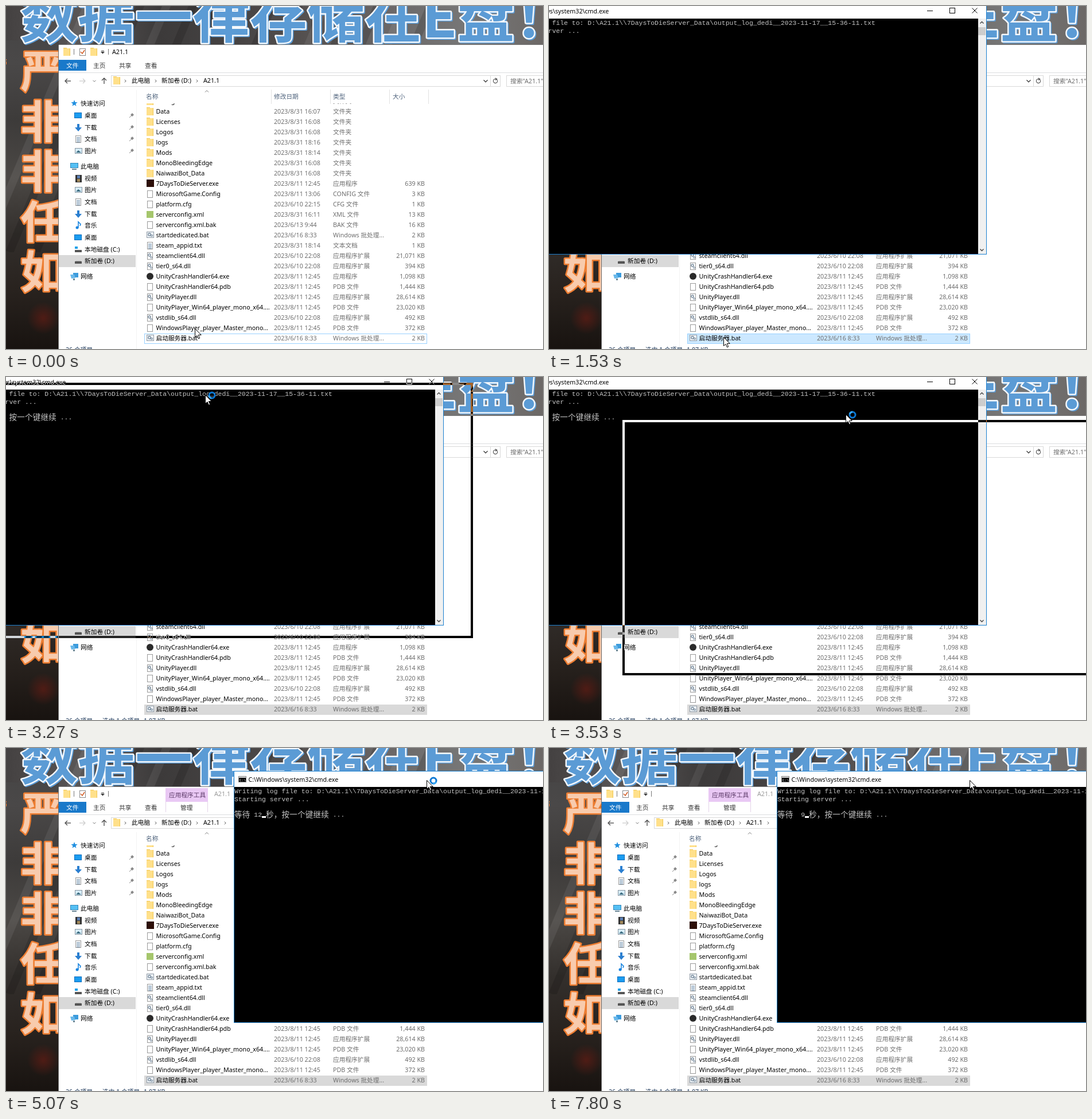
Animation of 936 by 599 pixels, one loop 8 s. Source, as an HTML page with a canvas:

```html
<!DOCTYPE html>
<html lang="zh-CN">
<head>
<meta charset="utf-8">
<style>
html, body { margin: 0; width: 100%; height: 100%; overflow: hidden; background: #fff; }
canvas { display: block; }
</style>
</head>
<body>
<canvas id="stage" width="936" height="599"></canvas>
<script>
const g = document.getElementById('stage').getContext('2d');
const UI = '10.7px "Noto Sans", "Noto Sans CJK SC", sans-serif';
const MONO = '11.45px "Liberation Mono", monospace';
const HAN = '300 13.5px "Noto Sans CJK SC", sans-serif';
const CELL = 6.87, LINE = 13.74, STEP = 1000 / 15, LOOP = 8000;

// Pointer and drag rectangle: [tick, x, y], 15 ticks per second
const pointerPath = [[0, 329, 563], [5, 304, 578], [24, 304, 578], [27, 298, 470], [31, 280, 180],
  [35, 268, 52], [37, 264, 25], [39, 258, 10], [47, 258, 10], [49, 347, 31], [50, 385, 150],
  [52, 470, 90], [55, 610, 15], [58, 700, 30], [61, 733, 56]];
const dragPath = [[48, 266, 14], [49, 303, 25], [50, 370, 151], [53, 470, 90], [56, 610, 13],
  [59, 700, 30], [62, 733, 56]];

const files = [
  ['Config', '8/31 16:07', 'd'], ['Data', '8/31 16:07', 'd'], ['Licenses', '8/31 16:08', 'd'],
  ['Logos', '8/31 16:08', 'd'], ['logs', '8/31 18:16', 'd'], ['Mods', '8/31 18:14', 'd'],
  ['MonoBleedingEdge', '8/31 16:08', 'd'], ['NaiwaziBot_Data', '8/31 16:08', 'd'],
  ['7DaysToDieServer.exe', '8/11 12:45', 'game', '应用程序', '639'],
  ['MicrosoftGame.Config', '8/11 13:06', 'doc', 'CONFIG 文件', '3'],
  ['platform.cfg', '6/10 22:15', 'doc', 'CFG 文件', '1'],
  ['serverconfig.xml', '8/31 16:11', 'xml', 'XML 文件', '13'],
  ['serverconfig.xml.bak', '6/13 9:44', 'doc', 'BAK 文件', '16'],
  ['startdedicated.bat', '6/16 8:33', 'bat', 'Windows 批处理...', '2'],
  ['steam_appid.txt', '8/31 18:14', 'txt', '文本文档', '1'],
  ['steamclient64.dll', '6/10 22:08', 'dll', '应用程序扩展', '21,071'],
  ['tier0_s64.dll', '6/10 22:08', 'dll', '应用程序扩展', '394'],
  ['UnityCrashHandler64.exe', '8/11 12:45', 'unity', '应用程序', '1,098'],
  ['UnityCrashHandler64.pdb', '8/11 12:45', 'doc', 'PDB 文件', '1,444'],
  ['UnityPlayer.dll', '8/11 12:45', 'dll', '应用程序扩展', '28,614'],
  ['UnityPlayer_Win64_player_mono_x64....', '8/11 12:45', 'doc', 'PDB 文件', '23,020'],
  ['vstdlib_s64.dll', '6/10 22:08', 'dll', '应用程序扩展', '492'],
  ['WindowsPlayer_player_Master_mono...', '8/11 12:45', 'doc', 'PDB 文件', '372'],
  ['启动服务器.bat', '6/16 8:33', 'bat', 'Windows 批处理...', '2']];

const places = [
  ['快速访问', 170, 'star', 1], ['桌面', 191, 'desk'], ['下载', 212, 'down'], ['文档', 232, 'txt'],
  ['图片', 253, 'pic'], ['此电脑', 280, 'pc', 1], ['视频', 301, 'film'], ['图片', 321, 'pic'],
  ['文档', 342, 'txt'], ['下载', 363, 'down'], ['音乐', 383, 'note'], ['桌面', 404, 'desk'],
  ['本地磁盘 (C:)', 425, 'sys'], ['新加卷 (D:)', 445, 'disk'], ['网络', 472, 'net', 1]];

function rect(x, y, w, h, color) { g.fillStyle = color; g.fillRect(x, y, w, h); }
function box(x, y, w, h, color, fill) {
  if (fill) rect(x, y, w, h, fill);
  g.strokeStyle = color; g.lineWidth = 1; g.strokeRect(x + .5, y + .5, w - 1, h - 1);
}
function text(s, x, y, color = '#000', align = 'left') {
  g.font = UI; g.fillStyle = color; g.textAlign = align; g.fillText(s, x, y + 4); g.textAlign = 'left';
}
function trace(points, close) {
  g.beginPath();
  for (let i = 0; i < points.length; i += 2) g.lineTo(points[i], points[i + 1]);
  if (close) g.closePath();
}
function line(points, color = '#555', width = 1) {
  trace(points); g.strokeStyle = color; g.lineWidth = width; g.stroke();
}
function poly(points, color) { trace(points, true); g.fillStyle = color; g.fill(); }
function disc(x, y, r, color) { g.beginPath(); g.arc(x, y, r, 0, 7); g.fillStyle = color; g.fill(); }
function arc(x, y, r, a, b, color, width) {
  g.beginPath(); g.arc(x, y, r, a, b); g.strokeStyle = color; g.lineWidth = width; g.stroke();
}
// Chevron pointing along (dx, dy)
function chevron(x, y, dx, dy, s, color, w) {
  line([x - dx * s / 2 - dy * s, y - dy * s / 2 - dx * s, x + dx * s / 2, y + dy * s / 2,
    x - dx * s / 2 + dy * s, y - dy * s / 2 + dx * s], color, w);
}
function at(path, t) {
  let i = 0;
  while (i < path.length - 2 && t > path[i + 1][0]) i++;
  const [a, b] = [path[i], path[i + 1]];
  const k = Math.min(1, Math.max(0, (t - a[0]) / (b[0] - a[0])));
  return [1, 2].map(j => Math.round(a[j] + (b[j] - a[j]) * k));
}
function gradient(x, y, stops) {
  const f = g.createLinearGradient(0, 0, x, y);
  stops.forEach((c, i) => f.addColorStop(i / (stops.length - 1), c));
  return f;
}

function icon(kind, x, y) {
  const page = () => box(x - 5, y - 6, 10, 13, '#999', '#fff');
  const draw = {
    d() { rect(x - 6, y - 7, 6, 3, '#f0c650'); rect(x - 6, y - 6, 12, 13, '#ffe08a'); rect(x + 5, y - 6, 1, 13, '#f0c650'); },
    doc: page,
    txt() { page(); for (let i = -3; i < 6; i += 2) rect(x - 3, y + i, 6, 1, '#7a99b5'); },
    dll() { page(); arc(x - 1, y - 1, 2, 0, 7, '#7b8ea0', 1.5); arc(x + 2, y + 3, 1.5, 0, 7, '#7b8ea0', 1); },
    bat() { box(x - 6, y - 6, 13, 11, '#8f9aa5', '#eef3f7'); arc(x - 1, y - 1, 2.2, 0, 7, '#7b8ea0', 1.4); arc(x + 3, y + 1, 1.5, 0, 7, '#7b8ea0', 1.2); },
    game() { rect(x - 6, y - 7, 13, 13, '#2c0e08'); },
    xml() { rect(x - 6, y - 6, 12, 12, '#a5c66c'); },
    unity() { disc(x, y, 6, '#2a2a2a'); },
    star() {
      const p = [];
      for (let i = 0; i < 10; i++) {
        const r = i % 2 ? 2.5 : 6, a = i * Math.PI / 5;
        p.push(x + r * Math.sin(a), y - r * Math.cos(a));
      }
      poly(p, '#1f8fe0');
    },
    desk() { box(x - 7, y - 5, 13, 10, '#0a6cbd', '#1b9cf0'); },
    down() { poly([x - 2, y - 6, x + 2, y - 6, x + 2, y, x + 6, y, x, y + 7, x - 6, y, x - 2, y], '#2b7fd0'); },
    pic() { box(x - 6, y - 5, 13, 10, '#8795a0', '#d6ecf8'); poly([x - 4, y + 3, x, y - 1, x + 5, y + 3], '#3b6c80'); },
    pc() { box(x - 7, y - 6, 14, 9, '#3388bb', '#55c0f4'); rect(x - 4, y + 4, 8, 2, '#6b8796'); },
    film() { rect(x - 5, y - 6, 11, 13, '#333'); rect(x - 2, y - 5, 5, 5, '#5a7fb5'); rect(x - 2, y + 1, 5, 5, '#a0885a'); },
    note() { line([x, y + 4, x, y - 6, x + 4, y - 2, x + 3, y + 1], '#1b86e0', 1.6); disc(x - 2, y + 4, 2.5, '#1b86e0'); },
    disk() { rect(x - 6, y + 1, 12, 4, '#555'); rect(x - 5, y, 10, 1, '#aaa'); },
    sys() { rect(x - 6, y + 1, 12, 4, '#555'); rect(x - 6, y - 5, 5, 4, '#20a0e8'); },
    net() { rect(x - 2, y - 6, 9, 8, '#3c9bdc'); poly([x - 7, y - 3, x, y - 3, x + 2, y + 3, x - 5, y + 4], '#69b8ea'); rect(x - 2, y + 4, 3, 3, '#6b8796'); }
  };
  draw[kind]();
}

function wallpaper() {
  rect(0, 0, 936, 70, gradient(936, 0, ['#444141', '#5a5757', '#3c3a3a', '#464343', '#565251', '#6b6868', '#777', '#6c6866']));
  rect(0, 60, 92, 539, gradient(0, 599, ['#444', '#4a4848', '#3d3b3a', '#4b4845', '#332f2c', '#28221e', '#181310']));
  g.save();
  g.beginPath(); g.rect(0, 0, 936, 68); g.rect(0, 0, 92, 430); g.clip();
  for (let i = 0; i < 14; i++) {
    const x = i * 46 - 40;
    line([x, 430, x + 190, -20], i % 3 ? 'rgba(0,0,0,.15)' : 'rgba(255,255,255,.07)', 14);
  }
  g.restore();
  const glow = g.createRadialGradient(65, 545, 2, 65, 545, 28);
  glow.addColorStop(0, 'rgba(95,28,20,.7)'); glow.addColorStop(1, 'rgba(95,28,20,0)');
  rect(30, 510, 62, 80, glow);

  g.lineJoin = 'round';
  g.font = '700 100px "Noto Sans CJK SC", sans-serif';
  const title = '数据一律存储在E盘！';
  g.lineWidth = 4; g.strokeStyle = '#5b9bd5'; g.strokeText(title, 27, 57);
  g.lineWidth = 5; g.strokeStyle = '#f4f8fc'; g.strokeText(title, 25, 55);
  g.fillStyle = '#5b9bd5'; g.fillText(title, 25, 55);
  g.font = '700 78px "Noto Sans CJK SC", sans-serif';
  [...'严非非任如'].forEach((c, i) => {
    const y = 143 + i * 87.5;
    g.lineWidth = 5; g.strokeStyle = '#ed7d31'; g.strokeText(c, 25, y);
    g.fillStyle = '#f8cbad'; g.fillText(c, 25, y);
  });
  g.lineJoin = 'miter';
  rect(0, 93, 1, 2, '#ed7d31'); rect(0, 97, 1, 5, '#ed7d31');
}

function explorer(tick) {
  const picked = tick >= 6, active = tick < 23;
  rect(92, 68, 844, 531, '#fff');
  rect(91, 68, 1, 531, '#6a6a6a'); rect(92, 67, 844, 1, '#777');

  icon('d', 106, 80); rect(118, 75, 1, 10, '#777');
  box(128, 74, 11, 13, '#888', '#fff'); line([130, 80, 133, 83, 137, 77], '#d2602a', 1.6);
  icon('d', 153, 80); rect(166, 78, 5, 1, '#333'); poly([165, 80, 172, 80, 168.5, 83.5], '#333');
  rect(178, 75, 1, 10, '#777');
  if (picked) {
    rect(278, 70, 74, 24, '#e9c8f4');
    rect(278, 94, 1, 18, '#e3d3e8'); rect(351, 94, 1, 18, '#e3d3e8');
    text('应用程序工具', 284, 82, '#5c3a68'); text('管理', 304, 104, '#333');
  }
  text('A21.1', picked ? 363 : 185, 80, active ? '#000' : '#999');
  rect(92, 94, 48, 19, '#1979ca'); text('文件', 105, 104, '#fff');
  text('主页', 152, 104, '#333'); text('共享', 197, 104, '#333'); text('查看', 242, 104, '#333');
  rect(92, 116, 844, 1, '#dcdddf');

  const arrow = (x, y, dx, dy, c) => {
    line([x - dx * 5, y - dy * 5, x + dx * 5, y + dy * 5], c, 1.3);
    chevron(x + dx * 3, y + dy * 3, dx, dy, 4, c, 1.3);
  };
  arrow(108, 131, -1, 0, '#444'); arrow(133, 131, 1, 0, '#ccc'); arrow(171, 131, 0, -1, '#444');
  chevron(154, 131, 0, 1, 2.5, '#777');
  box(183, 121, 679, 20, '#d9d9d9'); icon('d', 193, 130);
  for (const x of [208, 261, 333]) chevron(x, 131, 1, 0, 2.3);
  if (tick >= 63) chevron(382, 131, 1, 0, 2.3);
  text('此电脑', 219, 130); text('新加卷 (D:)', 271, 130); text('A21.1', 344, 130);
  chevron(836, 131, 0, 1, 3.5, '#444', 1.4); rect(844, 122, 1, 18, '#d9d9d9');
  arc(853, 131, 3.6, -.6, 4.6, '#555', 1.2); poly([853, 125, 857, 128, 853, 130], '#555');
  box(872, 121, 80, 20, '#d9d9d9'); text('搜索"A21.1"', 879, 131, '#6d6d6d');

  rect(227, 147, 1, 452, '#f3f3f3');
  rect(92, 435, 134, 21, '#d9d9d9');
  places.forEach(([name, y, kind, root], i) => {
    icon(kind, root ? 119 : 126, y); text(name, root ? 130 : 137, y);
    if (i > 0 && i < 5) { line([215, y + 4, 219, y], '#888'); poly([217, y - 1, 220, y - 4, 223, y - 1, 220, y + 2], '#8a8a8a'); }
  });

  const row = 572;
  if (tick < 4) box(241, row, 493, 18, '#99d1ff');
  else if (tick < 6) box(241, row, 493, 18, '#99d1ff', '#e5f3ff');
  else if (tick < 26) box(241, row, 493, 18, '#99d1ff', '#cce8ff');
  else rect(241, row, 493, 18, '#d9d9d9');
  g.save();
  g.beginPath(); g.rect(228, 170, 520, 429); g.clip();
  files.forEach(([name, date, kind, type = '文件夹', size], i) => {
    const y = 166 + i * 18;
    icon(kind, 251, y); text(name, 261.5, y);
    text('2023/' + date, 467, y, '#6d6d6d'); text(type, 570, y, '#6d6d6d');
    if (size) text(size + ' KB', 730, y, '#6d6d6d', 'right');
  });
  g.restore();
  text('名称', 244, 158, '#4c607a'); text('修改日期', 467, 158, '#4c607a');
  text('类型', 570, 158, '#4c607a'); text('大小', 674, 158, '#4c607a');
  for (const x of [462, 565, 668, 736]) rect(x, 146, 1, 25, '#e2e2e2');
  chevron(350, 149, 0, -1, 3, '#777');

  text('26 个项目', 104, 600, '#1e395b');
  if (picked) { text('选中 1 个项目', 168, 600, '#1e395b'); text('1.07 KB', 240, 600, '#1e395b'); }
}

function cells(s, x, y) {
  g.fillStyle = '#c4c4c4';
  for (const c of s) {
    const wide = c > '\u2000';
    g.font = wide ? HAN : MONO;
    g.fillText(c, x, y + (wide ? 5 : 4));
    x += CELL * (wide ? 2 : 1);
  }
}

function consoleWindow(x, y, tick) {
  rect(x, y, 839, 27, '#fff');
  box(x + 7, y + 8, 14, 11, '#888', '#000'); rect(x + 8, y + 9, 12, 2, '#ddd');
  g.font = '6px "Liberation Mono", monospace'; g.fillStyle = '#fff'; g.fillText('C:\\', x + 9, y + 17);
  text('C:\\Windows\\system32\\cmd.exe', x + 24.5, y + 13.5);
  rect(x + 736, y + 13, 10, 1, '#000'); box(x + 775, y + 8, 10, 10, '#000');
  line([x + 814.5, y + 8.5, x + 823.5, y + 17.5], '#000'); line([x + 823.5, y + 8.5, x + 814.5, y + 17.5], '#000');
  if (tick >= 23) {
    rect(x, y + 27, 839, 411, '#000');
    rect(x + 825, y + 27, 14, 411, '#f0f0f0'); rect(x + 825, y + 42, 13, 14, '#cdcdcd');
    chevron(x + 831.5, y + 34, 0, -1, 3, '#444', 1.4); chevron(x + 831.5, y + 431, 0, 1, 3, '#444', 1.4);
    cells('Writing log file to: D:\\A21.1\\\\7DaysToDieServer_Data\\output_log_dedi__2023-11-17__15-36-11.txt', x, y + 34);
    cells('Starting server ...', x, y + 34 + LINE);
    if (tick >= 27) {
      const left = String(12 - Math.floor((tick - 72) / 15)).padStart(2);
      cells(`等待 ${left} 秒，按一个键继续 ...`, x, y + 34 + 3 * LINE);
      rect(Math.round(x + CELL * (tick < 42 ? 28 : 7)), y + 78, 7, 3, '#fff');
    }
  }
  box(x - 1, y - 1, 841, 440, '#1b80cf');
}

function dragFrame([px, py]) {
  const x = px - 342, y = py - 15;
  g.globalCompositeOperation = 'difference';
  g.strokeStyle = '#fff'; g.lineWidth = 4; g.strokeRect(x + 2, y + 2, 849, 442);
  g.globalCompositeOperation = 'source-over';
}

function pointer([x, y], tick) {
  const shape = [0, 0, 0, 15, 3.5, 12, 6, 17.5, 8.2, 16.5, 5.8, 11, 10.7, 11].map((v, i) => v + (i % 2 ? y : x) + .5);
  poly(shape, '#fff');
  g.strokeStyle = '#000'; g.lineWidth = 1; g.stroke();
  if (tick >= 25 && tick < 113) {
    const a = tick * .42;
    arc(x + 12, y + 1, 5, 0, 7, '#0a78d4', 3);
    arc(x + 12, y + 1, 5, a, a + 1.3, '#38a8f4', 3);
  }
}

function draw(now) {
  const tick = Math.floor((now % LOOP + 3.4) / STEP) % 120;
  wallpaper();
  explorer(tick);
  if (tick >= 63) consoleWindow(398, 41, tick);
  else if (tick >= 22) consoleWindow(-77, -5, tick);
  if (tick >= 48 && tick < 63) dragFrame(at(dragPath, tick));
  pointer(at(pointerPath, tick), tick);
}

let start;
function loop(now) {
  start ??= now;
  draw(Math.max(0, now - start));
  requestAnimationFrame(loop);
}
draw(0);
requestAnimationFrame(loop);
</script>
</body>
</html>
```
